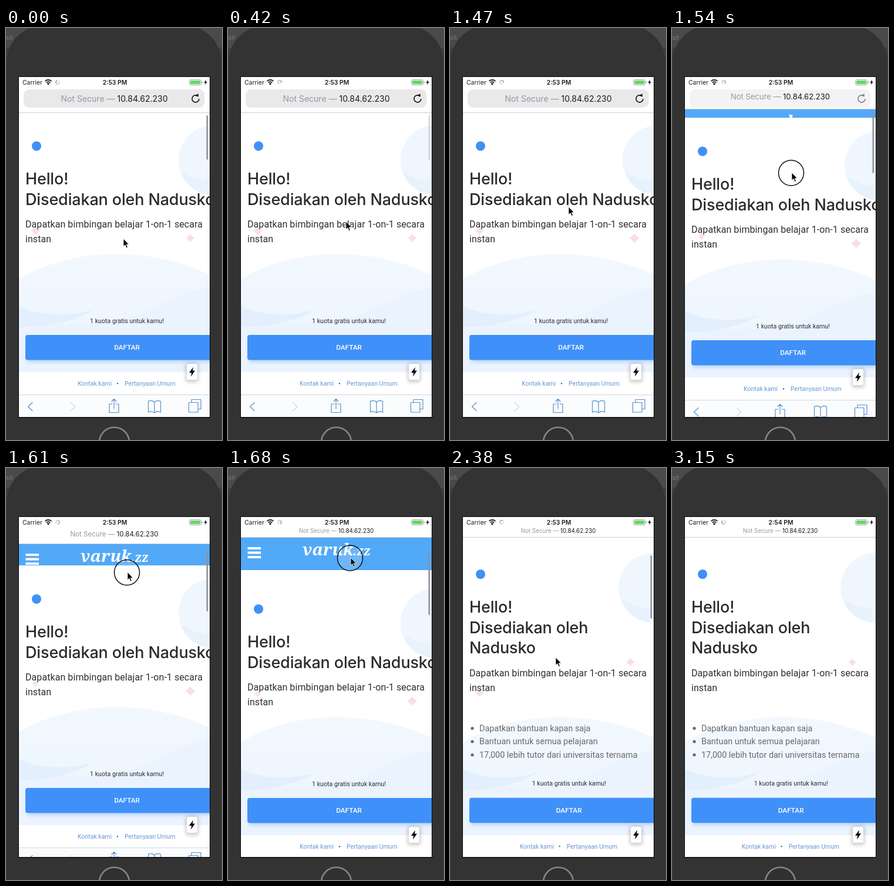
These frames come from a looping animation (368x698 px, 3.22 s). An HTML page:

```html
<!DOCTYPE html>
<html lang="id">
<head>
<meta charset="utf-8">
<title>Halaman bimbingan</title>
<style>
  html, body { margin: 0; width: 100%; height: 100%; overflow: hidden; background: #333334; }
  svg { display: block; width: 368px; height: 698px; }
  text { font-family: Roboto, "Noto Sans", sans-serif; fill: #2f2f31; white-space: pre; }
  .ios { font-family: Inter, "Noto Sans", sans-serif; fill: #1b1b1d; }
  .title { font: 500 27px Inter, "Noto Sans", sans-serif; letter-spacing: -.15px; fill: #2d292d; }
  .sub { font-size: 16px; letter-spacing: .07px; }
  .list { font-size: 14.4px; fill: #68686c; }
  .mid { text-anchor: middle; }
  .link { font-size: 10.5px; fill: #6698d6; }
  .line { fill: none; stroke: #5590cf; stroke-width: 1.2; stroke-linejoin: round; stroke-linecap: round; }
  .star { fill: #fbdede; stroke: #fbdede; stroke-width: 1; stroke-linejoin: round; }
</style>
</head>
<body>
<svg viewBox="0 0 368 698">
  <defs>
    <clipPath id="screen"><rect x="22" y="83" width="325" height="576"/></clipPath>
    <clipPath id="disc"><circle cx="353" cy="224" r="59"/></clipPath>
    <linearGradient id="mist" x2="0" y2="1">
      <stop stop-color="#f2f8fe"/><stop offset="1" stop-color="#ebf4fe"/>
    </linearGradient>
    <filter id="soft" x="-50%" y="-50%" width="200%" height="200%"><feGaussianBlur stdDeviation="3"/></filter>
    <path id="bolt" d="M2-8-5 1.5H-.8L-2 8 5-2H.8Z"/>
    <path id="star" d="M0-7 3-3 7 0 3 3 0 7-3 3-7 0-3-3Z"/>
  </defs>

  <!-- phone body -->
  <rect width="368" height="698" fill="#3f3f40"/>
  <rect width="368" height="33" fill="#4a4a4b"/>
  <text x="0" y="20" font-size="11" style="fill:#777">sit</text>
  <rect x="1" y="-4" width="366" height="800" rx="62" fill="#333334"/>
  <circle cx="184.5" cy="702" r="25.5" fill="#303031" stroke="#858586" stroke-width="2.6"/>
  <rect x="21" y="82" width="327" height="578.5" fill="#0c0c0d"/>

  <g clip-path="url(#screen)">
    <rect x="22" y="83" width="325" height="576" fill="#fff"/>

    <g id="header">
      <rect x="22" width="325" height="56" fill="#52a9f8"/>
      <path d="M33.5 19H56M33.5 26.5H56M33.5 34H56" stroke="#fff" stroke-width="4"/>
      <text class="mid" x="185" y="31" style="font:italic 700 28px 'Noto Serif',serif;fill:#fff">varuk<tspan font-size="21">.zz</tspan></text>
    </g>

    <g id="page">
      <rect id="sheet" x="22" y="143" width="325" height="600" fill="#fff"/>
      <g id="blob">
        <circle cx="353" cy="224" r="59" fill="#eff6fe"/>
        <path clip-path="url(#disc)" d="M290 247C310 240 318 262 347 258V290H290Z" fill="#e8f2fd"/>
      </g>
      <g id="hill">
        <path d="M22 425C70 397 130 383 184 383C250 383 305 398 347 418V583H22Z" fill="url(#mist)"/>
        <path d="M347 440C285 446 250 484 190 495C130 506 70 500 22 506V583H347Z" fill="#eaf3fe"/>
        <path d="M22 471C60 489 110 489 148 477C115 499 60 508 22 506Z" fill="#e3effd"/>
      </g>
      <g id="starL"><use href="#star" class="star"/></g>
      <g id="starR"><use href="#star" class="star"/></g>

      <g id="top">
        <circle cx="52" cy="200" r="8" fill="#4190f7"/>
        <text class="title" x="33" y="265">Hello!</text>
        <text class="title" x="33" y="299.5" id="lead"></text>
        <text class="title" x="33" y="334" id="name">Nadusko</text>
      </g>
      <g id="sub">
        <text class="sub" x="33" y="338">Dapatkan bimbingan belajar 1-on-1 secara</text>
        <text class="sub" x="33" y="363">instan</text>
      </g>
      <g id="list">
        <g fill="#68686c"><circle cx="38" cy="441" r="2.6"/><circle cx="38" cy="463.5" r="2.6"/><circle cx="38" cy="486" r="2.6"/></g>
        <text class="list" x="50" y="445.5">Dapatkan bantuan kapan saja</text>
        <text class="list" x="50" y="468">Bantuan untuk semua pelajaran</text>
        <text class="list" x="50" y="490.5">17,000 lebih tutor dari universitas ternama</text>
      </g>
      <g id="foot">
        <rect x="36" y="526" width="330" height="40" rx="4" fill="#4090f9" opacity=".3" filter="url(#soft)"/>
        <rect x="33" y="520" width="340" height="42.5" rx="4" fill="#4090f9"/>
        <g id="labels">
          <text class="mid" x="206" y="499.7" font-size="10.7">1 kuota gratis untuk kamu!</text>
          <text class="mid" x="206" y="545.3" font-size="11.8" font-weight="500" style="fill:#fff">DAFTAR</text>
          <text class="link" x="122" y="606">Kontak kami</text>
          <circle cx="190" cy="602.3" r="1.2" fill="#44699a"/>
          <text class="link" x="202" y="606">Pertanyaan Umum</text>
        </g>
        <rect x="306" y="568" width="22" height="32" rx="4" fill="#000" opacity=".2" filter="url(#soft)"/>
        <rect x="308" y="569" width="18" height="27" rx="3" fill="#fff"/>
        <use href="#bolt" x="317" y="582.5" fill="#000"/>
      </g>
    </g>

    <rect id="scroll" x="341.5" width="2.6" rx="1.3" fill="#8f949f"/>

    <g id="tools">
      <rect x="22" y="621" width="325" height="40" fill="#fbfcfd"/>
      <path d="M22 621.5H347" stroke="#d3d5d8"/>
      <path class="line" stroke-width="1.6" d="M45 634.5 37.5 641.5 45 648.5"/>
      <path class="line" style="stroke:#d4d7db" d="M110.5 634.5 118 641.5 110.5 648.5"/>
      <path class="line" d="M181 637H176V651.5H192V637H187M184 645V629M180 632.5 184 628.5 188 632.5"/>
      <path class="line" d="M253 634C250 630.5 245 631 242.5 632.5V651C246 649 250 649.5 253 652C256 649.5 260 649 263.5 651V632.5C261 631 256 630.5 253 634V652"/>
      <path class="line" d="M311.5 634.5H327V651H311.5ZM316 634.5V629.5H332V645.5H327"/>
    </g>

    <!-- browser bar -->
    <rect id="bar" x="22" y="83" width="325" fill="#fff"/>
    <path id="rule" d="M22 0H347" stroke="#cfcfd3"/>
    <g id="pill">
      <rect x="30" y="104" width="308.5" height="31" rx="9" fill="#e9e8eb"/>
      <path d="M326.5 115A6 6 0 1 0 329 120" fill="none" stroke="#111" stroke-width="1.6"/>
      <path d="M322.5 114.8 328 116.5 327.5 111Z" fill="#111"/>
    </g>
    <g id="url"><text class="ios mid" y="5" font-size="14"><tspan fill="#98989c">Not Secure — </tspan>10.84.62.230</text></g>

    <text class="ios" x="28" y="95.7" font-size="10.4">Carrier</text>
    <g fill="none" stroke="#111" stroke-width="1.7">
      <path d="M66.5 90A8 8 0 0 1 77.5 90M68.7 92.5A5 5 0 0 1 75.3 92.5"/>
    </g>
    <path d="M72 96.8 69.8 94.3A3.2 3.2 0 0 1 74.2 94.3Z" fill="#111"/>
    <g id="spin" stroke="#777" stroke-width="1"></g>
    <text class="ios mid" id="clock" x="185.5" y="95.8" font-size="10.4" font-weight="600"></text>
    <rect x="312.5" y="87.5" width="20" height="9" rx="2.4" fill="#fff" stroke="#a3a3a6"/>
    <rect x="314" y="89" width="17" height="6" rx="1" fill="#67d56a"/>
    <path d="M334.2 90.5V93.5" stroke="#a3a3a6" stroke-width="1.4"/>
    <use href="#bolt" transform="translate(340 92) scale(.55)" fill="#111"/>
  </g>

  <circle id="ring" r="21.5" fill="#fff" fill-opacity=".15" stroke="#111" stroke-width="1.5"/>
  <path id="cursor" d="M0 0V13.2L3.1 10.4 5.2 15.4 7.4 14.5 5.3 9.7H9.4Z" fill="#000" stroke="#fff" stroke-width=".8"/>
</svg>

<script>
const LOOP = 3220, STEP = 70;
const RELAYOUT = 25, LIST_IN = 30, MINUTE = 40;
const $ = id => document.getElementById(id);
const set = (id, attrs) => { for (const k in attrs) $(id).setAttribute(k, attrs[k]); };
const move = (id, x, y, extra = '') => set(id, { transform: `translate(${x} ${y}) ${extra}` });
const show = (id, on) => set(id, { opacity: +on });

// Each key is [step, ...values]; values are interpolated in between.
const pointer = [[0, 200, 357], [2, 200, 353], [10, 202, 303], [21, 202, 303], [22, 204, 245], [23, 207, 176.5],
  [24, 209, 152], [26, 210, 138], [28, 209, 140], [33, 181, 312], [34, 180, 321], [36, 178, 340], [38, 176, 500], [41, 174, 710]];
const pull = [[21, 0], [22, 9], [23, 22], [24, 39]];
const thumb = [[0, 148, 75, 1], [4, 148, 75, 1], [7, 148, 75, 0], [21, 148, 100, 0], [22, 145, 101, 1],
  [23, 142, 101, 1], [25, 148, 107, 1], [35, 148, 107, 1], [39, 148, 107, 0]];
const glowL = [[0, 1], [12, 1], [21, .95], [23, .78], [26, .8], [34, .95], [45, .6]];
const glowR = [[0, .9], [12, 1], [21, 1.08], [26, 1.06], [34, .95], [45, .85]];

function at(keys, f) {
  const i = keys.findIndex(k => k[0] > f);
  if (i === 0) return keys[0].slice(1);
  if (i < 0) return keys[keys.length - 1].slice(1);
  const a = keys[i - 1], b = keys[i], u = (f - a[0]) / (b[0] - a[0]);
  return a.slice(1).map((v, n) => v + (b[n + 1] - v) * u);
}

for (let i = 0; i < 12; i++)
  $('spin').innerHTML += `<path d="M0-2V-4.2" transform="rotate(${i * 30})" opacity="${.15 + i * .07}"/>`;

function draw(f) {
  const late = f >= RELAYOUT;
  const s = at(pull, f)[0], p = Math.min(1, s / 38), edge = 143 - 26 * p;
  const dx = late ? (f < LIST_IN ? -6 : -6.7) : 0;

  move('header', 0, edge);
  show('header', s > 0 && !late);
  move('page', 0, late ? 0 : s);
  set('sheet', { y: late ? 117 : 143 });
  move('blob', dx, late ? -21 : 0);
  move('hill', 0, late ? 42 : 0, late ? 'translate(0 583) scale(1 1) translate(0 -586)' : '');
  const l = at(glowL, f)[0], r = at(glowR, f)[0];
  move('starL', 50.5, late ? 381 : 343.5, `scale(${l})`);
  show('starL', 1);
  $('starL').setAttribute('opacity', Math.min(1, l));
  move('starR', 314 + dx, late ? 329 : 356, `scale(${r})`);
  move('top', 0, late ? -20 : 0);
  $('lead').textContent = 'Disediakan oleh' + (late ? '' : ' Nadusko');
  show('name', late);
  move('sub', 0, late ? 15 : 0);
  show('list', f >= LIST_IN);
  move('foot', 0, late ? 38.7 : 0);
  move('labels', dx / 2, 0);

  const [ty, th, to] = at(thumb, f);
  set('scroll', { y: ty, height: th, opacity: to });
  move('tools', 0, s);
  show('tools', !late);
  set('bar', { height: edge - 83 });
  move('rule', 0, edge + .5);
  set('pill', { opacity: Math.max(0, 1 - 2 * p) });
  move('url', 184.5, 119.5 - 13.5 * p, `scale(${1 - .3 * p})`);
  move('spin', 88, 91.8, `rotate(${Math.floor(f * 36 / 46) * 30})`);
  $('clock').textContent = f < MINUTE ? '2:53 PM' : '2:54 PM';

  const [x, y] = at(pointer, f);
  move('cursor', x, y);
  move('ring', x - 1, y + .5);
  show('ring', f >= 22 && f <= 28);
}

let start;
function tick(now) {
  start ??= now;
  draw(Math.floor((now - start) % LOOP / STEP));
  requestAnimationFrame(tick);
}
draw(0);
requestAnimationFrame(tick);
</script>
</body>
</html>
```
